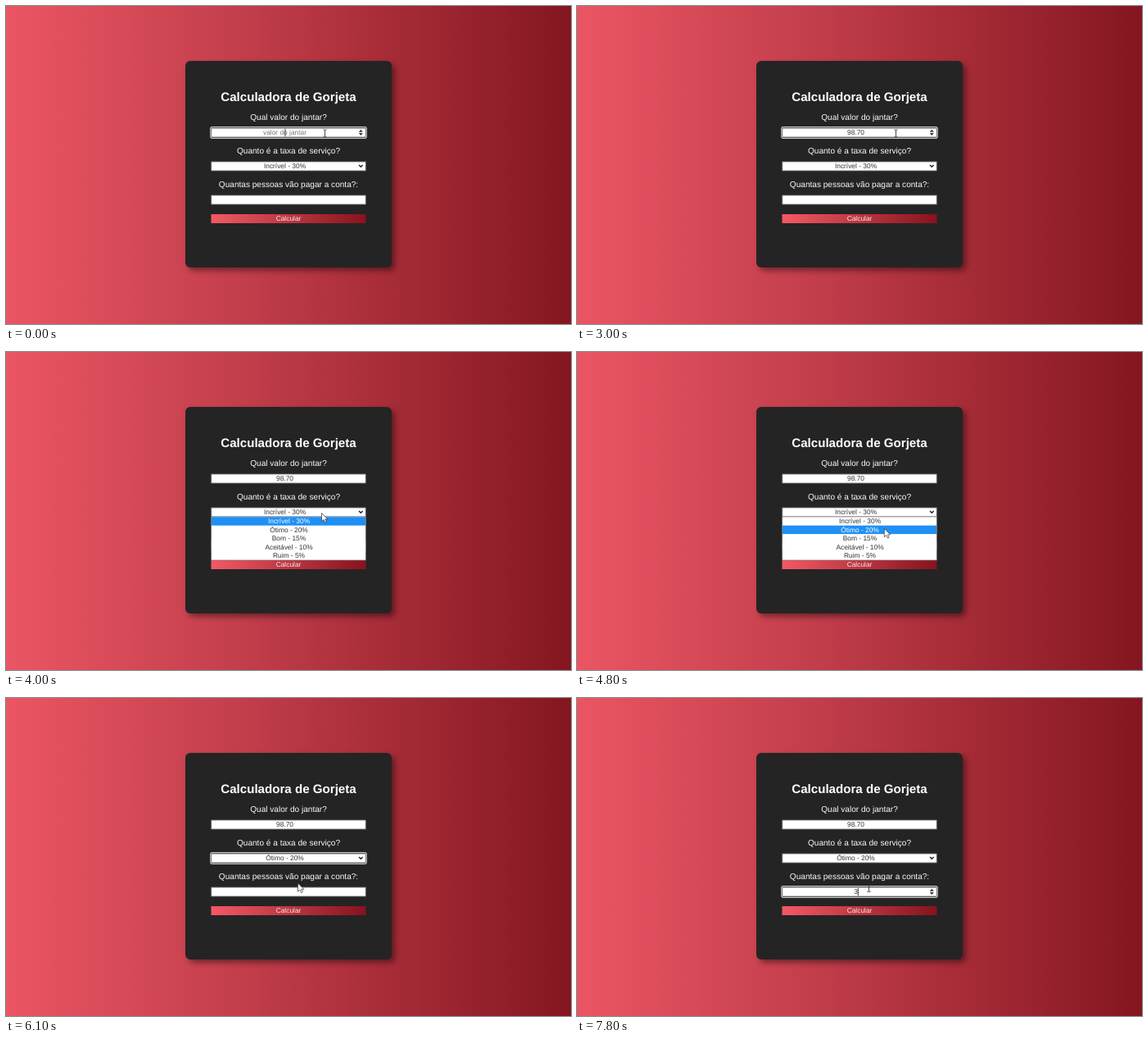
An HTML page for the animation above (8000 ms loop, 690 by 388 pixels).

```html
<!DOCTYPE html>
<html lang="pt-BR">
<head>
<meta charset="utf-8">
<title>Calculadora de Gorjeta</title>
<style>
  html, body { margin: 0; width: 100%; height: 100%; overflow: hidden; }
  body { background: linear-gradient(90deg, #eb5563, #c23e4b 42%, #841620); }
  .card {
    position: absolute; left: 219px; top: 67px; width: 252px; height: 252px;
    border-radius: 6px; background: #242424;
    box-shadow: 4px 4px 7px rgba(0, 0, 0, .42);
  }
  svg { position: absolute; left: 0; top: 0; }
  text {
    font: 8.4px "Liberation Sans", Arial, sans-serif;
    text-anchor: middle; text-rendering: geometricPrecision; fill: #333;
  }
  .title { font-size: 15.12px; font-weight: bold; fill: #fff; }
  .label { font-size: 10.08px; fill: #fafafa; }
  .light { fill: #f6e9ea; }
  .hint { fill: #777; }
  .field { fill: #fff; stroke: #9a9a9a; stroke-width: .8; }
  .ring { fill: #fff; }
  .ring + .gap { fill: #101010; }
</style>
</head>
<body>
<div class="card"></div>
<svg id="stage" width="690" height="388" viewBox="0 0 690 388">
  <defs>
    <linearGradient id="red">
      <stop offset="0" stop-color="#f35965"/>
      <stop offset="1" stop-color="#86131d"/>
    </linearGradient>
  </defs>
</svg>
<script>
const LOOP = 8000, STEP = 100, MID = 340.5;
const stage = document.getElementById('stage');

function add(tag, attrs, parent = stage, content = '') {
  const el = document.createElementNS('http://www.w3.org/2000/svg', tag);
  for (const key in attrs) el.setAttribute(key, attrs[key]);
  el.textContent = content;
  return parent.appendChild(el);
}
const rect = (x, y, width, height, attrs, parent) =>
  add('rect', { x, y, width, height, ...attrs }, parent);
const text = (x, y, content, cls = '', parent) =>
  add('text', { x, y, class: cls }, parent, content);
const show = (el, on) => el.setAttribute('visibility', on ? 'visible' : 'hidden');

function field(y) {
  const ring = add('g', {});
  rect(249.4, y - 1.8, 191.2, 14.6, { rx: 2, class: 'ring' }, ring);
  rect(250.4, y - .8, 189.2, 12.6, { rx: 1, class: 'gap' }, ring);
  rect(250.9, y + .1, 188.2, 10.8, { class: 'field' });
  return { ring, value: text(MID, y + 8, '') };
}

function numberField(y) {
  const parts = field(y);
  parts.spin = add('path', {
    d: `M430.8 ${y + 4.7}l2.5 -2.9l2.5 2.9zM430.8 ${y + 6.1}l2.5 2.9l2.5 -2.9z`, fill: '#333'
  });
  parts.caret = rect(MID, y + .8, .9, 9.4, { fill: '#222' });
  return parts;
}

text(345, 115.6, 'Calculadora de Gorjeta', 'title');
text(345, 139, 'Qual valor do jantar?', 'label');
text(345, 180, 'Quanto é a taxa de serviço?', 'label');
text(345, 221, 'Quantas pessoas vão pagar a conta?:', 'label');
const bill = numberField(149);
const rate = field(190);
add('path', { d: 'M431 193.9l2.3 2.4l2.3 -2.4', fill: 'none', stroke: '#222', 'stroke-width': 1.4 });
const people = numberField(231);
rect(250.5, 254, 189, 11, { fill: 'url(#red)' });
text(345, 262.4, 'Calcular', 'light');

const ROW = 10.4, TOP = 201.3;
const menu = add('g', {});
rect(250.7, TOP - .3, 188.6, 53, { fill: '#fff', stroke: '#777', 'stroke-width': .7 }, menu);
const mark = rect(251, TOP, 188, ROW, { fill: '#1e90f5' }, menu);
const rates = ['Incrível - 30%', 'Ótimo - 20%', 'Bom - 15%', 'Aceitável - 10%', 'Ruim - 5%'];
const options = rates.map((name, i) => text(345.5, TOP + 8.1 + i * ROW, name, '', menu));

const arrow = add('path', {
  d: 'M0 0V10.2L2.4 8L4 11.6L5.8 10.8L4.2 7.4H7.4Z',
  fill: '#fff', stroke: '#333', 'stroke-width': .7
});
const beam = add('path', {
  d: 'M-2 -4.5H-.6L0 -4L.6 -4.5H2M0 -4V4M-2 4.5H-.6L0 4L.6 4.5H2',
  fill: 'none', stroke: '#333', 'stroke-width': .9
});

// [time, value] steps
const typed = [[0, ''], [900, '9'], [1200, '98'], [1800, '98.'], [2300, '98.7'], [2500, '98.70']];
const counted = [[0, ''], [7800, '3']];
const billCaret = [[0, 1], [400, 0], [900, 1], [1700, 0], [1800, 1], [3000, 0]];
const peopleCaret = [[0, 0], [6800, 1], [7400, 0], [7800, 1]];
// [time, x, y] of the pointer tip
const path = [
  [0, 389.5, 155.5], [3200, 389.5, 155.5], [3800, 385.5, 196.5], [4100, 385.5, 196.5],
  [4800, 375.3, 215.5], [5500, 375.3, 215.5], [6000, 356.5, 226], [6200, 356.5, 226],
  [6500, 356.5, 232], [LOOP, 356.5, 232]
];

const at = (steps, t) => steps.filter(s => s[0] <= t).pop()[1];

function pointer(t) {
  const i = path.findIndex(p => p[0] > t);
  const [t0, x0, y0] = path[i - 1], [t1, x1, y1] = path[i];
  const u = (t - t0) / (t1 - t0), e = u * u * (3 - 2 * u);
  return [x0 + (x1 - x0) * e, y0 + (y1 - y0) * e];
}

function setNumber(box, value, hint, focused, spinning, caretOn) {
  box.value.textContent = value || hint;
  box.value.setAttribute('class', value ? '' : 'hint');
  const width = value ? box.value.getComputedTextLength() : 0;
  box.caret.setAttribute('x', MID + width / 2);
  show(box.ring, focused);
  show(box.spin, spinning);
  show(box.caret, caretOn);
}

function draw(t) {
  const [x, y] = pointer(t);
  const open = t >= 4000 && t < 5500;
  const inPeople = t >= 6800;
  const overInput = !open && ((y > 149 && y < 160) || y > 230.5);

  setNumber(bill, at(typed, t), 'valor do jantar', t < 4000, t < 4000, at(billCaret, t));
  setNumber(people, at(counted, t), '', inPeople, inPeople || (t > 6000 && overInput), at(peopleCaret, t));

  rate.value.textContent = rates[t < 5500 ? 0 : 1];
  show(rate.ring, t >= 5500 && !inPeople);

  const row = Math.max(0, Math.floor((y - TOP) / ROW));
  menu.setAttribute('display', open ? 'inline' : 'none');
  mark.setAttribute('y', TOP + row * ROW);
  options.forEach((o, i) => { o.style.fill = i === row ? '#fff' : '#333'; });

  for (const shape of [arrow, beam]) {
    shape.setAttribute('transform', `translate(${x} ${y})`);
    show(shape, (shape === beam) === overInput);
  }
}

const start = performance.now();
function tick() {
  const t = (performance.now() - start) % LOOP;
  draw(Math.floor(t / STEP) * STEP);
  requestAnimationFrame(tick);
}
tick();
</script>
</body>
</html>
```
